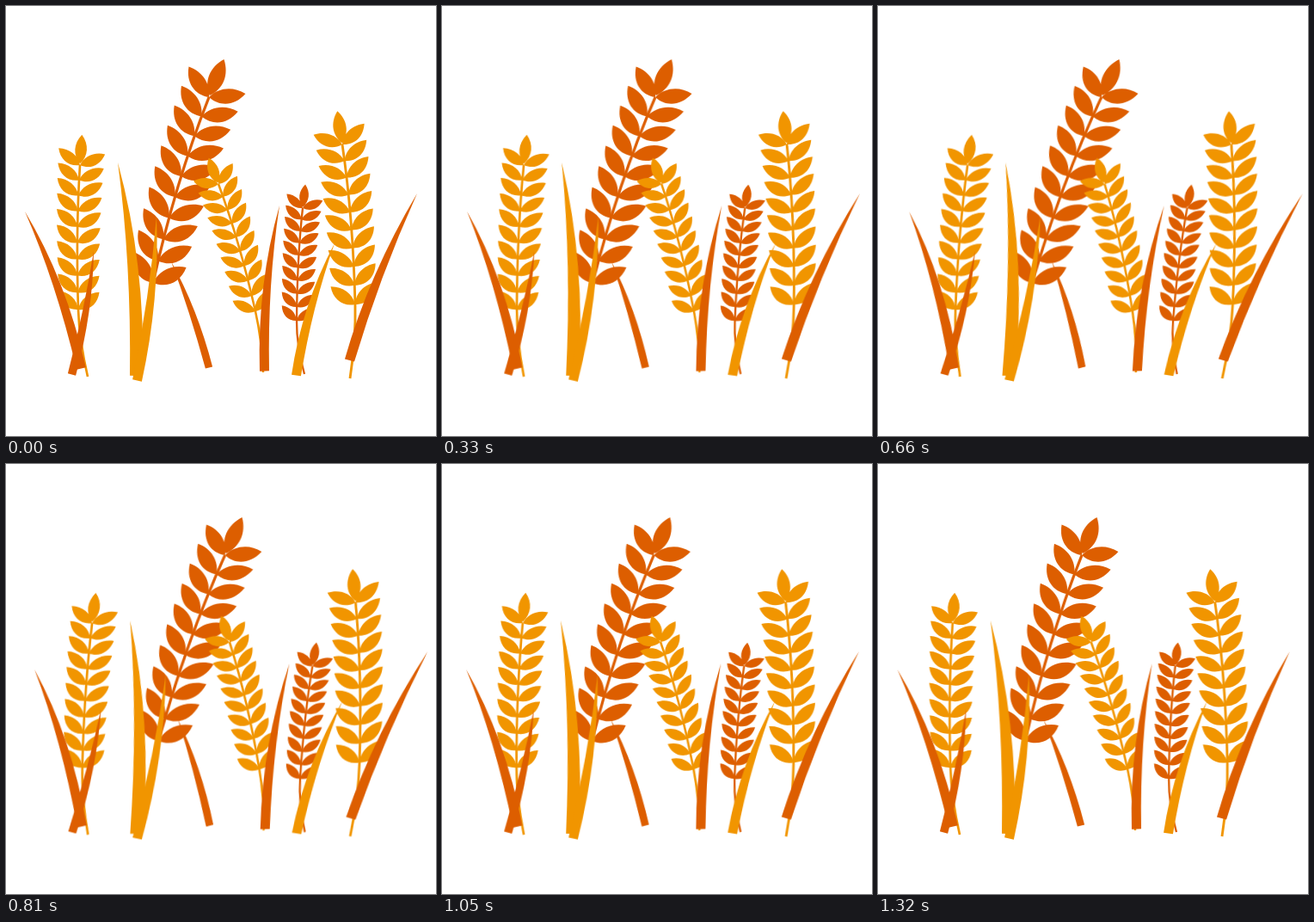
Write an HTML page that moves like this. It is 500 px wide and 500 px high and loops after 1350 ms.

```html
<!DOCTYPE html>
<html>
<head>
<meta charset="utf-8">
<title>Wheat</title>
<style>
  html, body { margin: 0; width: 100%; height: 100%; overflow: hidden; background: #fff; }
  svg { display: block; width: 100vw; height: 100vh; }
  #field { transform-origin: 0 437px; }
</style>
</head>
<body>
<svg viewBox="0 0 500 500"><g id="field"></g></svg>
<script>
const NS = 'http://www.w3.org/2000/svg';
const field = document.getElementById('field');
const LIGHT = '#f19500', DARK = '#dd5e00';
const ROWS = 10, LEFT = -1, RIGHT = 1;

const mix = (a, b, t) => [a[0] + (b[0] - a[0]) * t, a[1] + (b[1] - a[1]) * t];
const move = (p, angle, r) => [p[0] + r * Math.cos(angle), p[1] + r * Math.sin(angle)];
const heading = (a, b) => Math.atan2(b[1] - a[1], b[0] - a[0]);

function addPath(d, attrs) {
  const p = document.createElementNS(NS, 'path');
  p.setAttribute('d', d);
  for (const k in attrs) p.setAttribute(k, attrs[k]);
  field.append(p);
}

// A lens from base along angle; side makes its lower edge a little fuller.
function leaf(base, angle, length, side = 0) {
  const at = (x, y) => move(move(base, angle, x * length), angle + Math.PI / 2, y * length);
  const up = .27 - .03 * side, down = .27 + .03 * side;
  return `M${base}C${at(.28, -up)} ${at(.68, -up)} ${at(1, 0)}C${at(.68, down)} ${at(.28, down)} ${base}Z`;
}

// Leaf pairs follow a bent stem and fold upwards less on the wide side.
function ear(color, wide, top, bend, bottom, foot) {
  const size = Math.hypot(top[0] - bottom[0], top[1] - bottom[1]);
  let stem = `M${top}Q${bend} ${bottom}`;
  if (foot) stem += `Q${mix(bend, bottom, 1.4)} ${foot}`;
  addPath(stem, { fill: 'none', stroke: color, 'stroke-width': 1 + size / 100 });

  let d = leaf(move(top, heading(bend, top), size * .01), heading(bend, top), size * .2);
  for (let i = 0; i < ROWS; i++) {
    const t = i / (ROWS - 1);
    const a = mix(top, bend, t), b = mix(bend, bottom, t);
    for (const side of [LEFT, RIGHT]) {
      const spread = (side === wide ? 63 : 55) - 10.5 * t;
      d += leaf(mix(a, b, t), heading(b, a) + side * spread * Math.PI / 180, size * .189, side);
    }
  }
  addPath(d, { fill: color });
}

// A blade of grass, tapering from a square-cut base to its tip.
function blade(color, tip, bend, base, width) {
  const across = heading(bend, base) + Math.PI / 2;
  const [b1, b2] = [1, -1].map(s => move(bend, across, s * width * .55));
  const [e1, e2] = [1, -1].map(s => move(base, across, s * width / 2));
  addPath(`M${tip}Q${b1} ${e1}L${e2}Q${b2} ${tip}Z`, { fill: color });
}

blade(DARK, [192, 297], [218, 353], [236, 420.5], 8.5);

ear(DARK, RIGHT, [236, 106], [196.5, 206], [171, 322]);
ear(LIGHT, RIGHT, [86, 185], [81, 263], [84, 353], [95, 431]);
ear(LIGHT, LEFT, [247, 207], [271.5, 273], [290, 355], [299, 426]);
ear(DARK, RIGHT, [345, 235], [338.5, 293.5], [338, 366], [347, 428]);
ear(LIGHT, LEFT, [391, 161], [403.5, 246], [406, 347], [400, 433]);

blade(DARK, [22, 239], [64, 320], [87.5, 421.5], 11);
blade(DARK, [102, 285], [96, 355], [76.5, 428.5], 9.5);
blade(LIGHT, [130, 182], [154, 300], [151.5, 430], 15);
blade(LIGHT, [175, 245], [173, 339], [152.5, 435.5], 11);
blade(DARK, [318, 232], [298, 324], [300.5, 424.5], 11);
blade(LIGHT, [382, 276], [350, 349], [337.5, 429.5], 11);
blade(DARK, [478, 218], [428, 314], [399.5, 412], 11.5);

field.animate([
  { transform: 'skewX(0deg)', offset: 0 },
  { transform: 'skewX(-4.12deg)', offset: 22 / 45 },
  { transform: 'skewX(0deg)', offset: 1 }
], { duration: 1350, iterations: Infinity });
</script>
</body>
</html>
```
